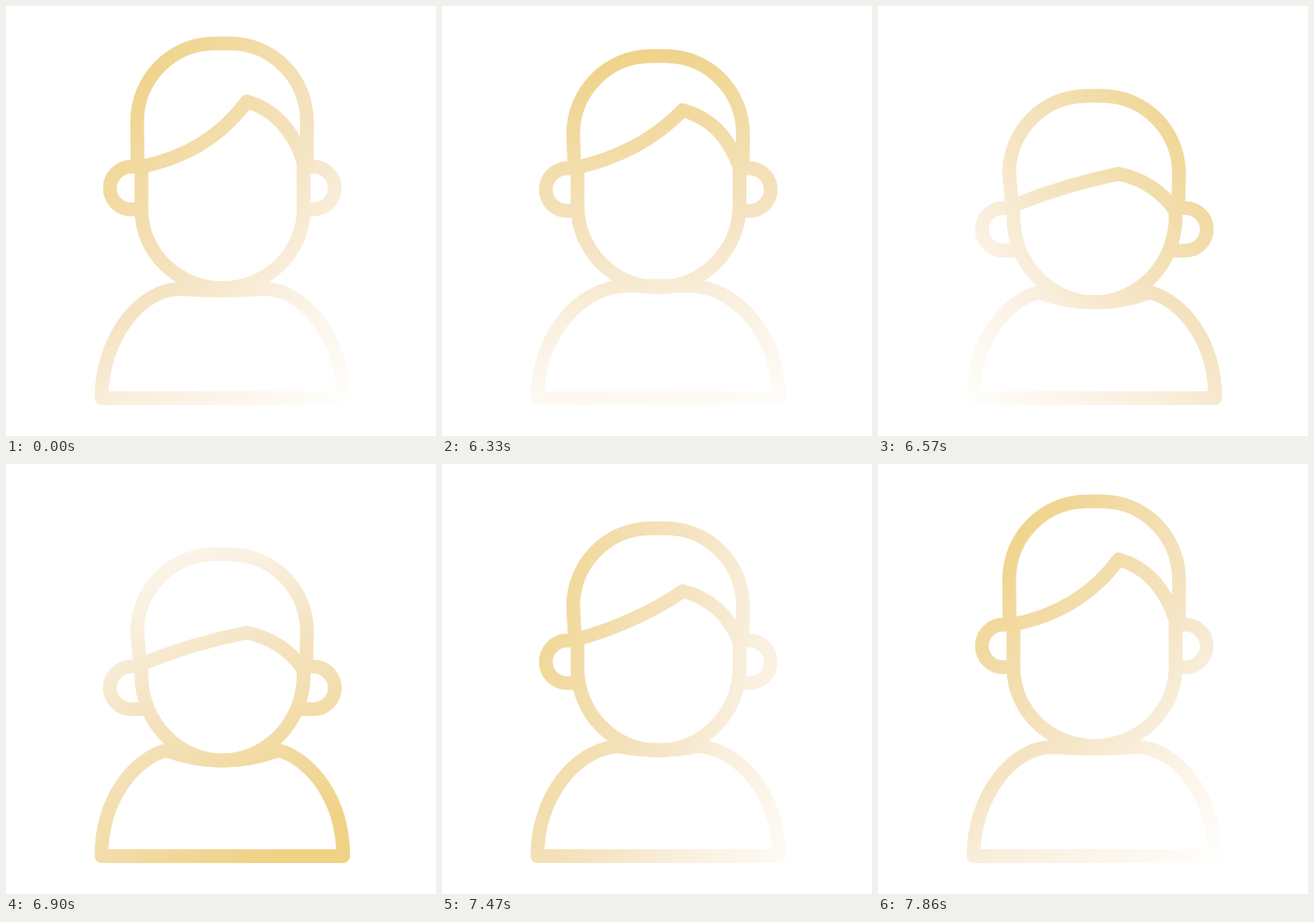
An HTML page without scripts for the animation above (7.89 s loop, 500x500 px).

```html
<!DOCTYPE html>
<html lang="en">
<head>
<meta charset="utf-8">
<title>Nodding person</title>
<style>
  html, body { margin: 0; width: 100%; height: 100%; overflow: hidden; background: #fff; }
  svg { display: block; width: 100%; height: 100%; }

  path {
    fill: none;
    stroke: url(#gold);
    stroke-width: 16;
    stroke-linejoin: round;
    d: var(--rest);
    animation: nod 7890ms infinite;
  }

  .hair {
    --rest: path("M153 185L152.5 135C152.5 84 193 43.5 243 43.5H260C310 43.5 350 84 350 135L350 187");
    --up: path("M153 168L152.5 129C152.5 78 193 37.5 243 37.5H260C310 37.5 350 78 350 129L350 168");
    --down: path("M156 234L152.5 196C152.5 145 193 105 243 105H260C310 105 350 145 350 196L349 236");
  }
  .fringe {
    --rest: path("M156 187Q235 172 280 111Q328 125 346 182");
    --up: path("M156 168Q237 155 280 88Q329 102 346 164");
    --down: path("M156 233Q218 208 280 196Q322 205 345 238");
  }
  .face {
    --rest: path("M157.5 187V237C157.5 287 200 328 251.5 328S346 287 346 237V180");
    --up: path("M157.5 168V226C157.5 277 200 319.5 251.5 319.5S346 277 346 226V161");
    --down: path("M157.5 236V246C157.5 300 200 344.5 251.5 344.5S346 300 346 246V232");
  }
  .ears {
    --rest: path("M158 187h-12.5a24.7 24.7 0 0 0 0 49.5h13M345 187h12.5a24.7 24.7 0 0 1 0 49.5h-13");
    --up: path("M158 168h-12.5a24.7 24.7 0 0 0 0 49.5h13M345 168h12.5a24.7 24.7 0 0 1 0 49.5h-13");
    --down: path("M158 235.5h-12.5a24.7 24.7 0 0 0 0 49.5h18M345 235.5h12.5a24.7 24.7 0 0 1 0 49.5h-18");
  }
  .body {
    --rest: path("M111 456C111 388 155 329 203 329Q251.5 333 300 329C348 329 392 388 392 456Z");
    --up: path("M111 456C111 388 158 322 225 322Q251.5 312 278 322C345 322 392 388 392 456Z");
    --down: path("M111 456C111 388 150 343 186 333Q251.5 357 317 333C353 343 392 388 392 456Z");
  }

  @keyframes nod {
    0% { d: var(--rest); }
    76.17% { d: var(--rest); animation-timing-function: ease-out; }
    77.95% { d: var(--up); animation-timing-function: cubic-bezier(.46, 0, .58, 1); }
    83.65% { d: var(--down); }
    87.7% { d: var(--down); animation-timing-function: cubic-bezier(.95, 0, .75, 1); }
    97.15% { d: var(--up); animation-timing-function: ease-in-out; }
    99.8%, 100% { d: var(--rest); }
  }
</style>
</head>
<body>
<svg viewBox="0 0 500 500">
  <defs>
    <!-- A distant glow that circles the figure once per nod -->
    <radialGradient id="gold" gradientUnits="userSpaceOnUse" cx="250" cy="-440" r="940"
                    gradientTransform="rotate(-45 250 250)">
      <stop offset=".51" stop-color="#efd286"/>
      <stop offset=".755" stop-color="#f5e4c3"/>
      <stop offset=".85" stop-color="#faf0e0"/>
      <stop offset="1" stop-color="#fffefc"/>
      <animateTransform attributeName="gradientTransform" type="rotate" dur="7890ms"
        repeatCount="indefinite" calcMode="spline" keyTimes="0;.7618;1"
        values="-45 250 250;-45 250 250;315 250 250" keySplines="0 0 1 1;.3 0 .55 1"/>
    </radialGradient>
  </defs>
  <path class="body"/>
  <path class="ears"/>
  <path class="hair"/>
  <path class="face"/>
  <path class="fringe"/>
</svg>
</body>
</html>
```
